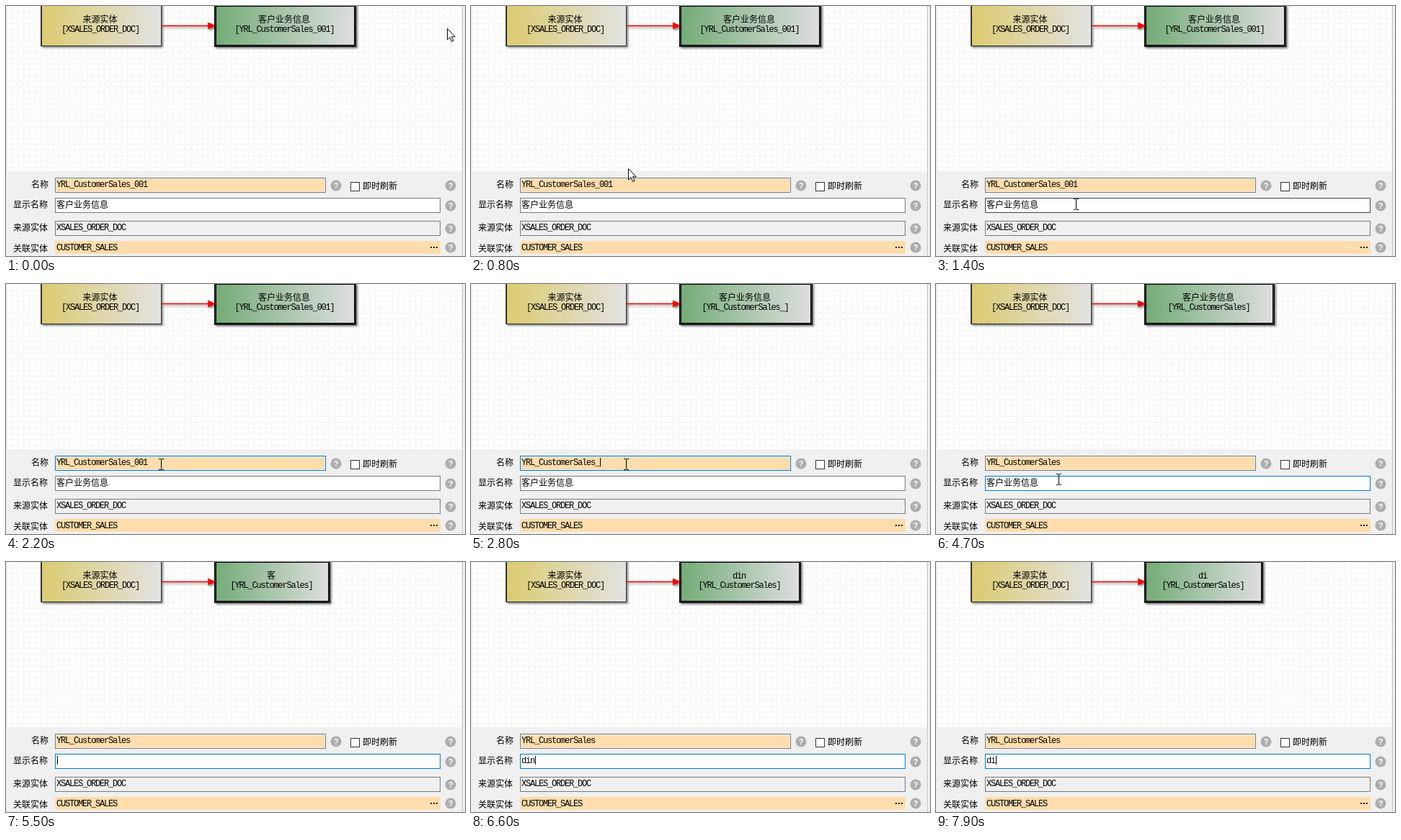
Recreate the animation shown at these times as an HTML page. Size 637 px wide and 348 px high, loop 8000 ms.

```html
<!DOCTYPE html>
<html lang="zh">
<head>
<meta charset="utf-8">
<title>实体关系</title>
<style>
html, body { margin: 0; width: 100%; height: 100%; overflow: hidden; background: #f0f0f0; }
svg { display: block; width: 100%; height: 100%; }
text { font: 12px "Noto Sans CJK SC", "Noto Sans CJK", sans-serif; fill: #000; white-space: pre; }
.mono { font: 12px "Liberation Mono", monospace; letter-spacing: -1.2px; }
.mid { text-anchor: middle; }
.mark { font: bold 11px "Liberation Sans", sans-serif; fill: #fff; text-anchor: middle; }
rect, .crisp { shape-rendering: crispEdges; }
.lift { filter: drop-shadow(2px 2px 1.5px rgba(0, 0, 0, .5)); }
</style>
</head>
<body>
<svg viewBox="0 0 637 348" preserveAspectRatio="none">
  <defs>
    <pattern id="grid" width="8" height="8" patternUnits="userSpaceOnUse">
      <path class="crisp" d="M0 .5H8M.5 2V8" stroke="#e8e6e2" stroke-dasharray="1 1"/>
    </pattern>
    <linearGradient id="gold"><stop stop-color="#dccb70"/><stop offset="1" stop-color="#e2e2e2"/></linearGradient>
    <linearGradient id="green"><stop stop-color="#74ac78"/><stop offset="1" stop-color="#dedede"/></linearGradient>
  </defs>
  <rect width="637" height="348" fill="#f0f0f0"/>
  <rect x="2" width="631" height="230" fill="#fff"/>
  <rect x="2" width="631" height="230" fill="url(#grid)"/>
  <rect x="633" width="1" height="348" fill="#c4c4c4"/>

  <g class="lift">
    <rect x="48" y="-10" width="168" height="66" fill="#333"/>
    <rect x="49.5" y="-10" width="165" height="64.5" fill="url(#gold)"/>
  </g>
  <text class="mid" x="130.5" y="22.5">来源实体</text>
  <text class="mono mid" x="131" y="36">[XSALES_ORDER_DOC]</text>

  <rect id="edge" class="lift" x="289" y="-2" height="59"/>
  <rect id="body" x="292" y="1" height="53" fill="url(#green)"/>
  <rect id="dots" x="290.5" y="-.5" height="56" fill="none" stroke="#666" stroke-dasharray="1 1"/>
  <text id="nodeTitle" class="mid" y="22.5"></text>
  <text id="nodeName" class="mono mid" y="36"></text>

  <path class="lift" d="M216 26.8H280V22.5L291 27.5L280 32.5V28.2H216Z" fill="#f00"/>

  <g id="form"></g>
  <rect x="478.5" y="245.5" width="12" height="12" fill="#fff" stroke="#333"/>
  <text x="495" y="255">即时刷新</text>
  <path class="crisp" d="M589 336h2m2 0h2m2 0h2" stroke="#222" stroke-width="2"/>
  <text id="name" class="mono" x="70" y="252"></text>
  <text id="title" x="70"></text>
  <rect id="caret" width="1" height="12"/>
  <g id="error">
    <circle cx="611" cy="277.5" r="7.5" fill="#e0282e"/>
    <text class="mark" x="611" y="281.5">!</text>
  </g>
  <path id="arrow" d="M.5 .5V16L4 12.6L6.6 18.4L9 17.3L6.4 11.7H11.2Z" fill="#fff" stroke="#000"/>
  <path id="beam" class="crisp" d="M-3 -7.5H0M1 -7.5H4M-3 7.5H0M1 7.5H4M.5 -7V7" fill="none" stroke="#000"/>
</svg>
<script>
const LOOP = 8000, TICK = 100, BLINK = 500;
const $ = id => document.getElementById(id);
const set = (id, attrs) => { for (const k in attrs) $(id).setAttribute(k, attrs[k]); };

const field = (id, y, w, h, fill, line) =>
  `<rect id="${id}" x="68.5" y="${y + .5}" width="${w}" height="${h}" fill="${fill}" stroke="${line}"/>`;
const inset = (y, w, h) =>
  `<rect x="69.5" y="${y + 1.5}" width="${w - 2}" height="${h - 2}" fill="none" stroke="#f0f0f0"/>`;
const label = (x, y, s) => `<text x="${x}" y="${y}">${s}</text>`;
const value = (y, s) => `<text class="mono" x="70" y="${y}">${s}</text>`;
const help = (x, y) => `<circle cx="${x}" cy="${y}" r="7.5" fill="#adadad"/>` +
  `<text class="mark" x="${x}" y="${y + 4}">?</text>`;

$('form').innerHTML =
  field('nameBox', 239, 375, 20, '#ffddac', '#7a7a7a') + inset(239, 375, 20) +
  field('titleBox', 267, 534, 20, '#fff', '#7a7a7a') +
  field('sourceBox', 299, 534, 20, '#f0f0f0', '#7a7a7a') +
  field('linkBox', 327, 534, 17, '#ffddac', '#ffddac') +
  label(35, 253, '名称') + label(10, 281, '显示名称') +
  label(10, 313, '来源实体') + label(10, 342, '关联实体') +
  value(312, 'XSALES_ORDER_DOC') + value(340, 'CUSTOMER_SALES') +
  help(458, 250) + [250, 278, 310, 336].map(y => help(617, y)).join('');

const FULL_NAME = 'YRL_CustomerSales_001', FULL_TITLE = '客户业务信息', PINYIN = 'dingda';

// each burst of input is a steady run of key presses or a single click
const burst = (start, gap = 1, count = 1) => ({ start, gap, count });
const pickName = burst(1700), trimName = burst(2400, 160, 4);
const pickTitle = burst(4200), clearTitle = burst(4800, 140, 6);
const type = burst(6270, 120, 6), erase = burst(7360, 170, 4);
const bursts = [pickName, trimName, pickTitle, clearTitle, type, erase];

const presses = (b, t) =>
  Math.max(0, Math.min(b.count, Math.floor((t - b.start) / b.gap) + 1));

function caretOn(t) {
  const b = bursts.filter(b => b.start <= t).pop();
  if (!b) return false;
  const last = b.start + (presses(b, t) - 1) * b.gap;
  return Math.floor((t - last) / BLINK) % 2 === 0;
}

const stop = (time, x, y) => ({ time, x, y });
const route = [
  stop(100, 612, 31), stop(400, 360, 19), stop(500, 360, 19), stop(800, 218, 226),
  stop(1300, 192, 279), stop(1800, 215, 251), stop(3600, 215, 251),
  stop(3800, 181, 280), stop(4300, 170, 272)
];

function pointer(t) {
  const i = route.findIndex(s => s.time > t);
  const b = route.at(i), a = i > 0 ? route[i - 1] : b;
  const k = a === b ? 0 : (t - a.time) / (b.time - a.time);
  const ease = k * k * (3 - 2 * k);
  return [Math.round(a.x + (b.x - a.x) * ease), Math.round(a.y + (b.y - a.y) * ease)];
}

function write(id, s, isLatin) {
  $(id).textContent = s;
  $(id).classList.toggle('mono', isLatin);
}

function drawNode(title, name, isLatin) {
  const caption = `[${name}]`;
  const w = 81 + 4 * (title.length + caption.length);
  const x = 288 + w / 2;
  set('edge', { width: w });
  set('dots', { width: w - 3 });
  set('body', { width: w - 6 });
  write('nodeTitle', title, isLatin);
  write('nodeName', caption, true);
  set('nodeTitle', { x: x - .5 });
  set('nodeName', { x });
}

function draw(t) {
  const isLatin = t >= type.start, inTitle = t >= pickTitle.start;
  const name = FULL_NAME.slice(0, FULL_NAME.length - presses(trimName, t));
  const title = isLatin
    ? PINYIN.slice(0, presses(type, t) - presses(erase, t))
    : FULL_TITLE.slice(0, FULL_TITLE.length - presses(clearTitle, t));

  // the node keeps the last character until the empty value is rejected
  const rejected = t >= 5700;
  drawNode(title || (rejected ? '' : FULL_TITLE[0]), name, isLatin);
  write('name', name, true);
  write('title', title, isLatin);
  set('title', { y: isLatin ? 280 : 281 });

  const [x, y] = pointer(t);
  const overName = y >= 242 && y <= 260, overTitle = y >= 267;
  const overField = overName || overTitle;
  const line = (focus, hover) => focus ? '#0078d7' : hover ? '#444' : '#7a7a7a';
  set('nameBox', { stroke: line(t >= pickName.start && !inTitle, overName) });
  set('titleBox', { stroke: line(inTitle, overTitle) });

  const end = inTitle ? title.length * (isLatin ? 6 : 12) : name.length * 6;
  set('caret', { x: 71 + end, y: inTitle ? 270 : 242, opacity: +caretOn(t) });
  const warn = rejected && !title && Math.floor((t - 5700) / 200) % 2 === 0;
  set('error', { opacity: +warn });

  const shown = t < clearTitle.start, transform = `translate(${x} ${y})`;
  set('arrow', { transform, opacity: +(shown && !overField) });
  set('beam', { transform, opacity: +(shown && overField) });
}

const start = performance.now();
let last = -1;
function frame() {
  const t = Math.floor((performance.now() - start) % LOOP / TICK) * TICK;
  if (t !== last) draw(last = t);
  requestAnimationFrame(frame);
}
frame();
</script>
</body>
</html>
```
